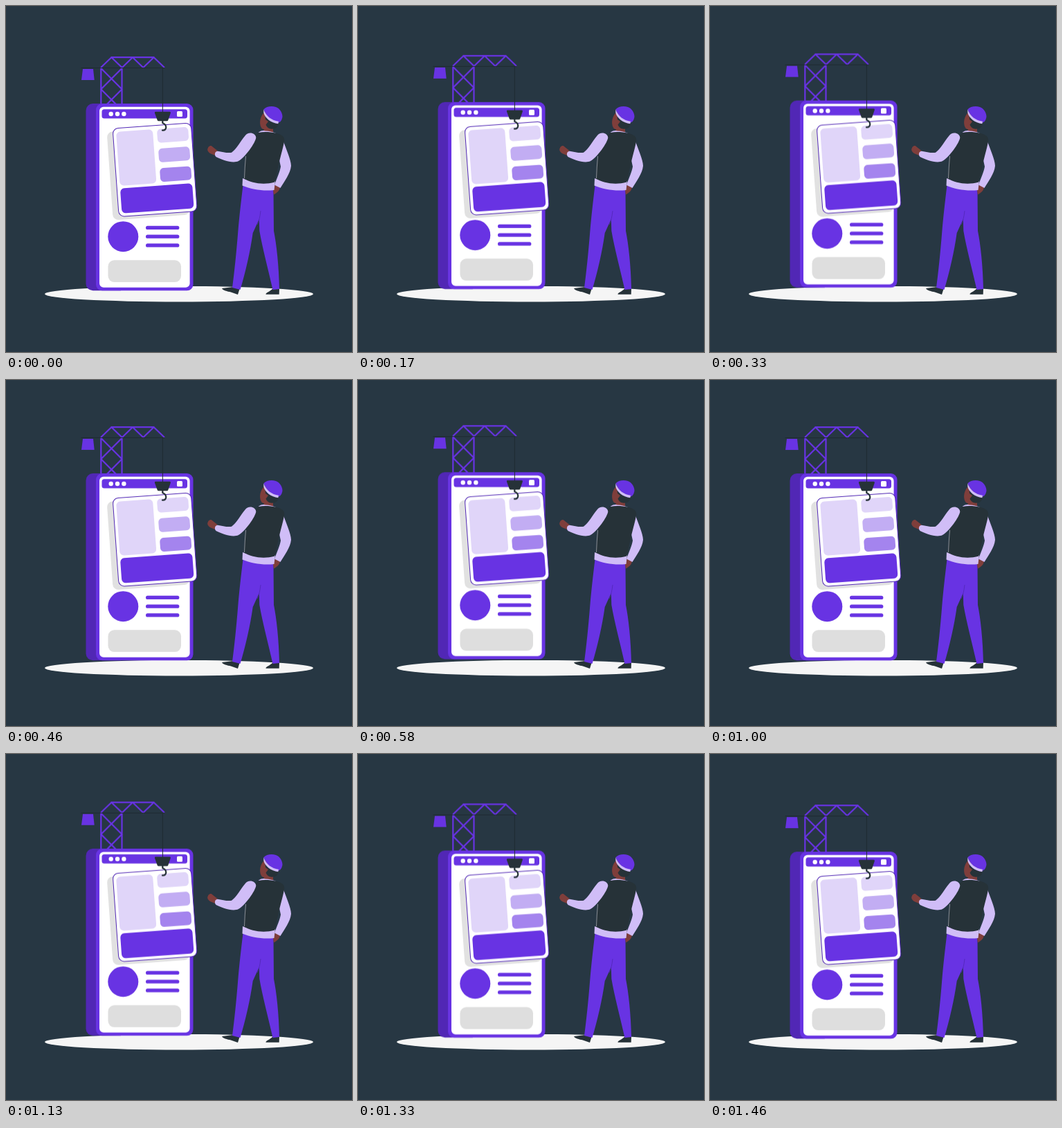
An HTML page for the animation above (1.5 s loop, 500x500 px).

```html
<!DOCTYPE html>
<html lang="en">
<head>
<meta charset="utf-8">
<title>App under construction</title>
<style>
  :root { --main: #6833e3; --side: #5127b5; --dark: #263238; --pale: #d0bdf7; --skin: #7f3e3b; }
  html, body { margin: 0; width: 100%; height: 100%; overflow: hidden; background: #273743; }
  svg { display: block; width: 100vw; height: 100vh; }
  .main { fill: var(--main); }
  .side { fill: var(--side); }
  .dark { fill: var(--dark); }
  .pale { fill: var(--pale); }
  .skin { fill: var(--skin); }
  .white { fill: #fff; }
  .grey { fill: #dedede; }
  .truss { fill: none; stroke: var(--main); stroke-width: 2.2; }
  .wire { fill: none; stroke: #1f2b32; stroke-width: 1; }
  .hook { fill: none; stroke: var(--dark); stroke-width: 2.2; stroke-linecap: round; }
  .bar { stroke: var(--main); stroke-width: 5.2; stroke-linecap: round; }

  /* Linear lift and drop, 24 positions per second */
  .lift { animation: lift 1500ms -4ms infinite; animation-timing-function: steps(18, end); }
  @keyframes lift {
    0% { transform: translateY(0); }
    49.999% { transform: translateY(-10px); }
    50% { transform: translateY(-9.28px); }
    100% { transform: translateY(.72px); }
  }
</style>
</head>
<body>
<svg viewBox="0 0 500 500">
  <ellipse cx="250" cy="416.2" rx="194" ry="11.3" fill="#f5f5f5"/>

  <g class="lift">
    <!-- crane -->
    <path class="truss" d="M137.3 90V145M167.5 90V145M137.3 90L167.5 120.3L137.3 150.6M167.5 90L137.3 120.3L167.5 150.6"/>
    <path class="truss" d="M137 89L152.4 74.2L167.7 89L183 74.2L198.3 89L213.6 74.2L229 89M151.5 74.2H214.4"/>
    <path class="wire" d="M108.500 89.500H229"/>
    <path class="main" d="M111 91H126L127.700 107H109z"/>

    <!-- phone -->
    <rect class="side" x="115.500" y="141" width="60" height="270.300" rx="10"/>
    <rect class="main" x="130" y="141" width="140.500" height="270.300" rx="9"/>
    <rect class="white" x="135" y="145.700" width="130.600" height="261" rx="6"/>
    <rect class="main" x="138.500" y="149.200" width="123.500" height="13.400" rx="3.500"/>
    <g class="white">
      <circle cx="151.700" cy="156" r="3.200"/>
      <circle cx="161" cy="156" r="3.200"/>
      <circle cx="170.400" cy="156" r="3.200"/>
      <rect x="247" y="152" width="8" height="8" rx="1.500"/>
    </g>
    <circle class="main" cx="169.300" cy="333.200" r="22"/>
    <path class="bar" d="M204.600 320.400H247.800M204.600 333.200H247.800M204.600 345.900H247.800"/>
    <rect class="grey" x="147.500" y="367.300" width="105.500" height="31.800" rx="9"/>

    <!-- card -->
    <g transform="translate(215.2 236.700) rotate(-4.100)">
      <rect x="-65.500" y="-59.500" width="111.500" height="127.800" rx="8" fill="#e1e1e1"/>
      <rect class="white" x="-56.700" y="-63.900" width="113.400" height="127.800" rx="8" stroke="#5127b5" stroke-width="1"/>
      <rect x="-52.100" y="-58.600" width="53" height="78.200" rx="6" fill="#e0d5f9"/>
      <rect x="6.900" y="-58.400" width="45.200" height="20" rx="5.500" fill="#e0d5f9"/>
      <rect x="6.900" y="-30.100" width="45.200" height="20" rx="5.500" fill="#c2adf3"/>
      <rect x="6.900" y="-1.700" width="45.200" height="20" rx="5.500" fill="#a484ee"/>
      <rect class="main" x="-52.100" y="23.200" width="104.400" height="36.300" rx="6"/>
    </g>

    <!-- hook -->
    <path class="wire" d="M226.400 89.500V153"/>
    <path class="dark" d="M216 152.800H236.500Q238.400 153 237.800 154.800L234.300 165Q233.800 166.300 232.500 166.300H220.500Q219.200 166.300 218.700 165L215 154.800Q214.400 153 216 152.800z"/>
    <path class="hook" d="M226.300 166V169Q231.300 171.200 231.300 175.500Q230.500 180.300 226 179.600"/>
  </g>

  <!-- man -->
  <path class="dark" d="M312 408L328 406L337.500 409L335 417L325 413.500C320 412.500 313 411 312 408zM385.500 408H395L394.700 416.800H375.500C375 414 382 413 385.500 408z"/>
  <path class="main" d="M342.500 259C355 265 372 267 386.500 265L387 325C391 345 394.300 375 395 409L385.500 410C380 385 370.500 350 366.300 325L365.800 308L356.700 328C353 355 346 385 338.500 410L327 407C330 385 333 355 335 330C337 305 340 280 342.500 259z"/>
  <path d="M368 296Q366.500 310 363 316" fill="none" stroke="#5127b5" stroke-width=".8"/>
  <path class="skin" d="M389 258L396 261C396 266 392 270 387 272.500L386 266z"/>
  <path class="pale" d="M400 193C404 205 412 222 412 231C411 242 402 254 396.500 263L388 258.500C391 250 396 239 397 232L394 218z"/>
  <path class="skin" d="M374 153C369 157 366 165 367.500 172C368.500 177 371 178 373 178L371 182.500H386V176L384 158z"/>
  <path class="dark" d="M374.500 158L380 163.500L394 169C393.500 174 391 177 386 177.500C381 178.500 377 175.500 375.500 171.500L379 167L375 164z"/>
  <path class="main" d="M372.300 149.500C376 145 384 144 390 146C397 148.500 400.500 157 399.200 161.500C398.300 165.500 396.500 168 394 168.500C386 168 377 161 372.300 149.500z"/>
  <path class="pale" d="M372.300 149.500C376 159.500 384 165.500 394 166.700L393.300 170.200C383 169 374 162 372.300 154z"/>
  <path class="pale" d="M365 182.500Q370 179 375 180.500Q383 180.500 390 184L388 186H366z"/>
  <path class="pale" d="M342 249C355 255 375 257 389 253L387.500 266C372 268 355 265 341.500 259.500z"/>
  <path class="dark" d="M365 183C373 181.500 382 182 390 183.800C398 185.500 402.500 189 402.300 194C401 203 397 216 393.500 231C391.500 240 390 248 388.300 254.500C372 259 355 256 344 249.500C345 235 346 222 348 210C350 200 358 189 365 183z"/>
  <path d="M344.500 249Q345 233 346.500 217" fill="none" stroke="#b5b7bd" stroke-width=".7"/>
  <path class="skin" d="M291.200 208C291.500 203.500 294.500 201.300 297 202.300L305.500 209L302.500 216C297 214 292 212.500 291.200 208z"/>
  <path class="pale" d="M345.500 187.500C349.500 181 360.500 182.500 361.300 190C361 197 345 219.500 336 224C328 228 312 222.500 303.500 218C300.500 215 302 209.500 306 209.700C313 211 321 213 326 211.700C333 207 339 195 345.500 187.500z"/>
</svg>
</body>
</html>
```
